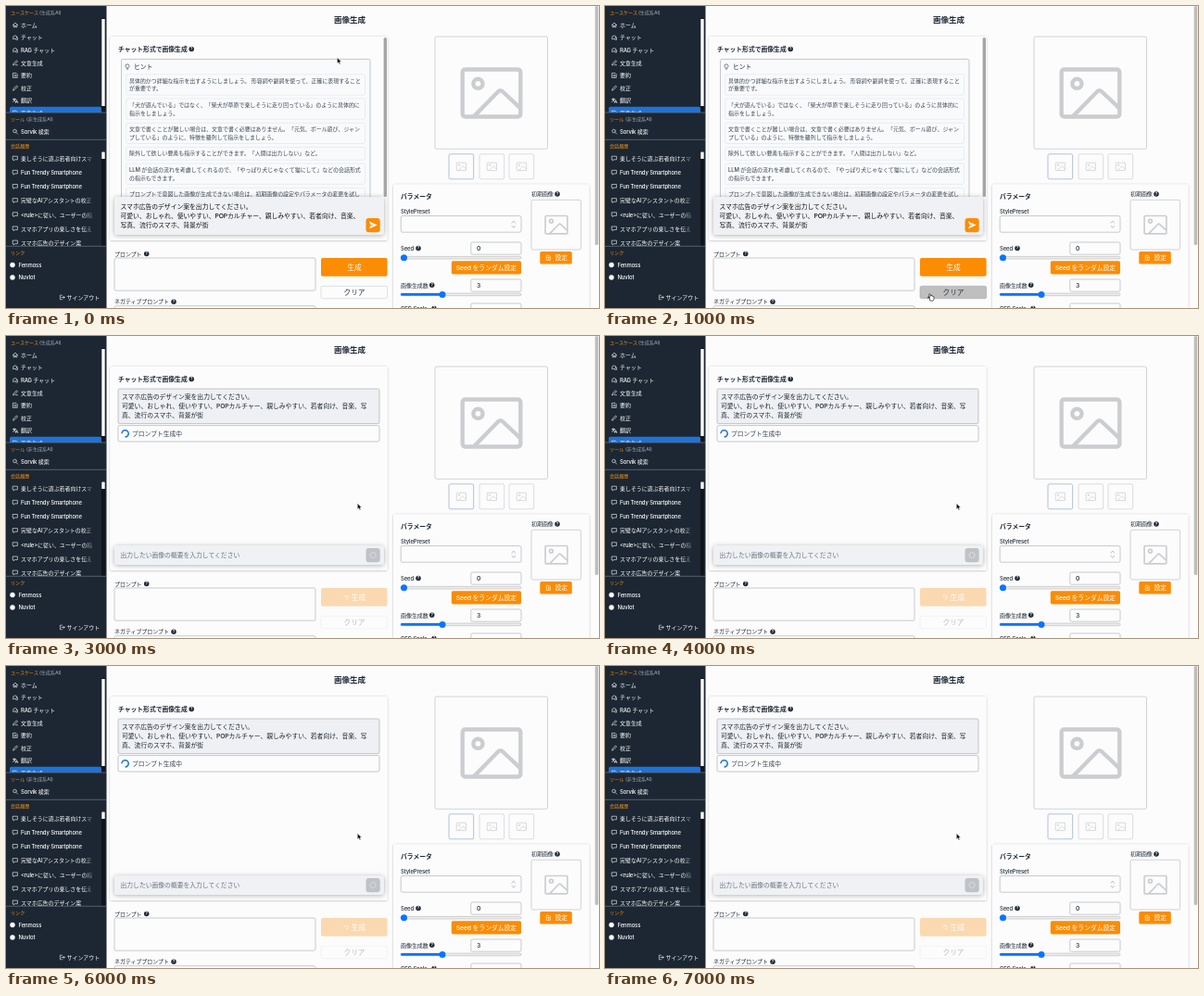
Recreate the animation shown at these times as an HTML page. Size 640x326 px, loop 8 s.

```html
<!DOCTYPE html>
<html lang="ja">
<head>
<meta charset="utf-8">
<title>画像生成</title>
<style>
html, body { margin: 0; width: 100%; height: 100%; overflow: hidden; background: #fcfcfc; }
svg { display: block; width: 640px; height: 326px; }
text {
  font-family: Inter, "Noto Sans CJK JP", "Noto Sans CJK", sans-serif;
  font-weight: 500; white-space: pre; text-spacing-trim: space-all;
}
.en { letter-spacing: -.02em; }
</style>
</head>
<body>
<svg id="stage" viewBox="0 0 640 326" xmlns="http://www.w3.org/2000/svg"></svg>
<script>
const NAVY = '#1c2733', ORANGE = '#fb8c04', BLUE = '#1f72d8', ACCENT = '#0b74ff';
const INK = '#1f2937', PAPER = '#fcfcfc', EDGE = '#a3a8b1', PALE = '#cbcdd0';
const S = 5.95, M = 6.8, L = 7.65;

const escape = s => s.replace(/&/g, '&amp;').replace(/</g, '&lt;').replace(/>/g, '&gt;');

// Text whose middle sits at cy; Latin runs get tighter tracking.
function text(x, cy, size, str, fill = INK, more = '') {
  const body = escape(str).replace(/[ -~]+/g, run => `<tspan class="en">${run}</tspan>`);
  return `<text x="${x}" y="${cy + size * .37}" font-size="${size}" fill="${fill}" ${more}>${body}</text>`;
}
const bold = 'style="font-weight:600"';
const mid = 'text-anchor="middle"';

function box(x1, y1, x2, y2, fill, stroke = 'none', r = 1.7, more = '') {
  return `<rect x="${x1}" y="${y1}" width="${x2 - x1}" height="${y2 - y1}" rx="${r}" fill="${fill}" stroke="${stroke}" stroke-width=".6" ${more}/>`;
}
const line = (d, color, w = .6, more = '') =>
  `<path d="${d}" fill="none" stroke="${color}" stroke-width="${w}" stroke-linecap="round" stroke-linejoin="round" ${more}/>`;
const at = (x, y, body) => `<g transform="translate(${x} ${y})">${body}</g>`;
const lines = (x, cy, step, size, rows, fill) =>
  rows.map((row, i) => text(x, cy + i * step, size, row, fill)).join('');

const help = (x, y) => `<circle cx="${x}" cy="${y}" r="2.75" fill="${INK}"/>` +
  text(x, y, 4.4, '?', '#fff', `${mid} ${bold}`);

const picture = (cx, cy, w) =>
  `<use href="#picture" transform="translate(${cx} ${cy}) scale(${w / 23})" stroke="${PALE}"/>`;

const defs = `<defs>
  <filter id="shadow" x="-10%" y="-10%" width="120%" height="125%">
    <feDropShadow dx="0" dy=".4" stdDeviation="1.1" flood-opacity=".28"/>
  </filter>
  <filter id="glow" x="-10%" y="-60%" width="120%" height="220%">
    <feDropShadow dx="0" dy=".6" stdDeviation="2.8" flood-opacity=".32"/>
  </filter>
  <linearGradient id="fade"><stop stop-color="${NAVY}" stop-opacity="0"/><stop offset="1" stop-color="${NAVY}"/></linearGradient>
  <clipPath id="uses"><rect width="108" height="114.8"/></clipPath>
  <clipPath id="talks"><rect width="108" height="259"/></clipPath>
  <g id="picture" fill="none" stroke-width="1.5">
    <rect x="-10.75" y="-8.75" width="21.5" height="17.5" rx="1"/>
    <circle cx="-5" cy="-3.5" r="1.75"/>
    <path d="M-6.6 8.7L2.5-.6Q3.3-1.3 4.1-.6L10.7 5.6"/>
  </g>
</defs>`;

// Small outline icons, each about 5.5 wide around its centre.
const icons = {
  home: 'M-2.7 .2L0-2.5L2.7 .2M-1.8-.4V2.4H-.6V.7H.6V2.4H1.8V-.4',
  chat: 'M-2.4 1.4Q-3-2.2-.3-2.2Q2-2 1.8 0Q1.4 1.6-.8 1.4ZM2-.6Q3 .6 2.4 2.4L.6 2.1',
  pen: 'M-2.3 2.3L-1.8.6L1.5-2.5L2.5-1.4L-.7 1.9ZM.5 2.4H2.5',
  note: 'M-2.2-2.5H1L2.2-1.3V2.5H-2.2ZM-1-.3H1M-1 1H1',
  check: 'M-2.3 2.3L-1.8.6L1.5-2.5L2.5-1.4L-.7 1.9Z',
  lang: 'M-2.6-1.5H.6M-1-2.5V-1.5M.1-1.5Q-.4.5-2.5 1.3M-1.8-1.4Q-1.2.3.2.9M.2 2.5L1.5-.6L2.8 2.5M.7 1.5H2.3',
  find: 'M1 1L2.6 2.6M1.3-.5A1.8 1.8 0 1 1-2.3-.5A1.8 1.8 0 1 1 1.3-.5',
  bubble: 'M-2.4-2.2H2.4V1.4H-.4L-1.8 2.6V1.4H-2.4Z',
  exit: 'M-.3-2.3H-2.3V2.3H-.3M-.8 0H2.5M1.2-1.3L2.5 0L1.2 1.3',
  file: 'M-1.9-2.5H.6L1.9-1.2V2.5H-1.9ZM0 1.4V-.7M-.9.1L0-.8L.9.1',
  bulb: 'M-.9 1.3Q-2.2.2-2-1Q-1.6-2.7 0-2.7Q1.6-2.7 2-1Q2.2.2.9 1.3ZM-.8 2.5H.8'
};
const icon = (name, x, y, color = '#fff') => at(x, y, line(icons[name], color));

function sidebar() {
  const head = (cy, title, note = '', x = 35.9) => text(5, cy, 5.1, title, '#f29113') +
    text(x, cy, 5.1, note, '#9aa3ad');
  const uses = [['home', 'ホーム'], ['chat', 'チャット'], ['chat', 'RAG チャット'], ['pen', '文章生成'],
    ['note', '要約'], ['check', '校正'], ['lang', '翻訳'], ['note', '画像生成']];
  const talks = ['楽しそうに遊ぶ若者向けスマ', 'Fun Trendy Smartphone', 'Fun Trendy Smartphone',
    '完璧なAIアシスタントの校正', '<rule>に従い、ユーザーの指', 'スマホアプリの楽しさを伝え', 'スマホ広告のデザイン案'];
  let out = box(0, 0, 108.5, 326, NAVY, 'none', 0) + head(7, 'ユースケース', '(生成系AI)');
  out += '<g clip-path="url(#uses)">' + box(4, 108.8, 103, 122, BLUE);
  uses.forEach(([name, label], i) => {
    const y = 20.5 + i * 13.6;
    out += icon(name, 10, y) + text(16, y, S, label, '#fff');
  });
  out += '</g>' + box(103, 13, 107, 114.5, '#10151c', 'none', 0) + box(103.3, 14, 106.7, 108, '#fff', 'none', .5);
  out += head(122, 'ツール', '(非生成系AI)', 22) +
    icon('find', 10, 135.5) + text(16, 135.5, S, 'Sorvik 検索', '#fff') + head(151.2, '会話履歴');
  out += '<g clip-path="url(#talks)">';
  talks.forEach((label, i) => {
    const y = 164.8 + i * 15.15;
    out += icon('bubble', 10, y - .4) + text(16, y, S, label, '#fff');
  });
  out += box(84, 157, 96, 259, 'url(#fade)', 'none', 0) + box(96, 157, 102.5, 259, NAVY, 'none', 0) + '</g>';
  out += box(103, 157, 107, 259, '#10151c', 'none', 0) + box(103.3, 157.5, 106.7, 165, '#fff', 'none', .5);
  out += [115, 144.3, 259.3].map(y => line(`M0 ${y}H108`, '#8d96a0', .5)).join('');
  out += head(266, 'リンク') + '<circle cx="7" cy="279.5" r="2.7" fill="#fff"/><circle cx="7" cy="293" r="2.7" fill="#fff"/>' +
    text(13.5, 279.5, S, 'Fenmoss', '#fff') + text(13.5, 293, S, 'Nuvlot', '#fff');
  return out + icon('exit', 60.7, 314.5) + text(65.5, 314.5, S, 'サインアウト', '#fff');
}

function results() {
  let out = box(463, 33, 584.5, 154.3, PAPER, '#b4b8be') + picture(524, 94, 67);
  [478, 511, 543].forEach((x, i) => {
    out += box(x, 159.8, x + 26.7, 186.8, PAPER, i ? '#c3c7cd' : '#7f9cc4') + picture(x + 13.4, 173.4, 11);
  });
  return out;
}

function slider(y, x) {
  return box(426, y - 1.3, 556, y + 1.3, '#eeeeee', '#b5b5b5', 1.3) +
    box(426, y - 1.4, x, y + 1.4, ACCENT, 'none', 1.4) + `<circle cx="${x}" cy="${y}" r="3.5" fill="${ACCENT}"/>`;
}

function params() {
  const field = (y, value) => box(501.8, y, 556, y + 13.2, PAPER, EDGE) + text(508, y + 6.6, M, value);
  return box(418, 192.5, 629.5, 345, PAPER, 'none', 2, 'filter="url(#shadow)"') +
    text(426, 205.5, M, 'パラメータ', INK, bold) + text(426, 221.8, S, 'StylePreset') +
    box(426.2, 226.6, 556, 244.2, PAPER, EDGE) +
    line('M546 234.2L547.8 232L549.6 234.2M546 237.2L547.8 239.4L549.6 237.2', EDGE, .7) +
    text(567, 203, S, '初期画像') + help(595, 203) +
    box(567, 209.3, 620.6, 263, PAPER, '#b4b8be') + picture(594, 236.2, 25.5) +
    box(576.3, 265.1, 610.8, 278.6, ORANGE) + icon('file', 585.5, 271.8, '#fff') + text(592.5, 271.8, M, '設定', '#fff') +
    text(426, 261.6, S, 'Seed') + help(445, 261.6) + field(255, '0') + slider(271.7, 429.5) +
    box(480.8, 275.2, 556, 289.5, ORANGE) + text(518.5, 282.4, M, 'Seed をランダム設定', '#fff', mid) +
    text(426, 301.3, S, '画像生成数') + help(459.7, 301.3) + field(295, '3') + slider(311.4, 471) +
    text(426, 326.6, S, 'CFG Scale') + help(462, 326.6) + field(321, '');
}

function promptForm() {
  return text(117, 267.5, S, 'プロンプト') + help(151.7, 267.5) + box(117, 272, 334, 307.2, PAPER, EDGE) +
    text(117, 319.2, S, 'ネガティブプロンプト') + help(181, 319.2) + box(117, 323.7, 334, 350, PAPER, EDGE);
}

// Three quarters of a ring, open at the lower left.
const busyRing = (x, y, r, color, w) => at(x, y,
  line(`M${-r} 0A${r} ${r} 0 1 1 0 ${r}`, color, w, 'style="stroke-linecap:butt"'));

function buttons(busy, hover) {
  const label = busy ? busyRing(367, 282, 2, '#fff', .7) + text(380.5, 282, L, '生成', '#fff', mid)
    : text(376, 282, L, '生成', '#fff', mid);
  return `<g opacity="${busy ? .3 : 1}">` + box(340, 272, 411.6, 291.8, ORANGE) + label +
    box(340, 302.4, 411.6, 315.8, hover ? '#bfbfbf' : PAPER, hover ? '#9fa3a9' : '#c9cdd3') +
    text(376, 309, L, 'クリア', '#2d3641', mid) + '</g>';
}

const card = box(112.3, 33, 411.6, 253, PAPER, 'none', 2, 'filter="url(#shadow)"') +
  text(121, 46.5, M, 'チャット形式で画像生成', INK, bold) + help(200.2, 46.5);

function hints() {
  const tips = [
    ['具体的かつ詳細な指示を出すようにしましょう。 形容詞や副詞を使って、正確に表現すること', 'が重要です。'],
    ['「犬が遊んでいる」ではなく、「柴犬が草原で楽しそうに走り回っている」のように具体的に', '指示をしましょう。'],
    ['文章で書くことが難しい場合は、文章で書く必要はありません。「元気、ボール遊び、ジャン', 'プしている」のように、特徴を羅列して指示をしましょう。'],
    ['除外して欲しい要素も指示することができます。「人間は出力しない」など。'],
    ['LLM が会話の流れを考慮してくれるので、「やっぱり犬じゃなくて猫にして」などの会話形式', 'の指示もできます。'],
    ['プロンプトで意図した画像が生成できない場合は、初期画像の設定やパラメータの変更を試し', 'てみましょう。']
  ];
  let y = 73.8;
  let out = box(124.5, 57.4, 393, 230, '#f9fafb', '#9ca3af') + icon('bulb', 131, 65.5, INK) + text(138, 65.5, M, 'ヒント');
  for (const tip of tips) {
    const h = tip.length * 8.5 + 5.3;
    out += box(129.8, y, 387.5, y + h, '#f9fafb', '#dfe2e7') + lines(133, y + 6.8, 8.5, S, tip, '#3c4552');
    y += h + 3.9;
  }
  return out;
}

const ask = 'スマホ広告のデザイン案を出力してください。';
const wish = '可愛い、おしゃれ、使いやすい、POPカルチャー、親しみやすい、若者向け、音楽、';
const inputBox = top => box(117, top, 408, 247, '#eff1f4', 'none', 3.4, 'filter="url(#glow)"');

function draft() {
  return hints() + box(407.6, 34, 411, 206, '#a6a6a6', 'none', 1.5) + inputBox(206) +
    lines(123.5, 216.4, 10.2, M, [ask, wish, '写真、流行のスマホ、背景が街'], '#111') +
    box(388.5, 229, 403.7, 244.2, ORANGE, 'none', 3) +
    at(396, 236.6, '<path d="M-4-4L4.6 0L-4 4L-2.6.6L1.5 0L-2.6-.6Z" fill="#fff"/>');
}

function waiting() {
  return box(121, 57, 403, 94.6, '#eff0f3', '#9ca3af') +
    lines(125, 65.5, 10.2, M, [ask, wish + '写', '真、流行のスマホ、背景が街'], '#1a2430') +
    box(121, 96.6, 403, 114, PAPER, '#9ca3af') + busyRing(128.6, 105.3, 3.6, BLUE, 1.6) +
    text(136, 105.3, M, 'プロンプト生成中', '#374151') + inputBox(226.4) +
    text(123.5, 236.6, M, '出力したい画像の概要を入力してください', '#6b7280') +
    box(388.5, 229, 403.7, 244.2, '#bfc2c7', 'none', 3) +
    at(396.1, 236.6, '<circle r="3" fill="none" stroke="#fff" stroke-width=".8" stroke-dasharray="1.3 1"/>');
}

const arrow = (x, y) => at(x, y,
  '<path d="M0 0V6.2L1.5 4.9L2.5 7.2L3.6 6.7L2.6 4.5H4.6Z" fill="#000" stroke="#fff" stroke-width=".5"/>');
const hand = (x, y) => at(x, y,
  '<path d="M-.8 0Q0-.8.6 0L1.2 2.2Q2-.1 2.6 2.3Q3.5 1.4 3.7 2.8Q4.7 2.4 4.6 3.6Q4.7 5.8 3.6 7.2H.3Q-1-.1-2.1 4.2Q-1.8 3-.1 4Z" fill="#fff" stroke="#000" stroke-width=".6"/>');

const base = defs + box(0, 0, 640, 326, PAPER, 'none', 0) + results() + params() + promptForm() +
  text(371, 14.8, 8.5, '画像生成', INK, `${mid} ${bold}`) + sidebar() +
  box(635.7, 0, 639.3, 258, '#bdbdbd', 'none', 1.6);

const scenes = [
  card + draft() + buttons(false, false) + arrow(357.4, 55.8),
  card + draft() + buttons(false, true) + hand(350.5, 311),
  card + draft() + buttons(false, false) + arrow(396.6, 248),
  card + waiting() + buttons(true, false) + arrow(379.3, 180.8)
];

const stage = document.getElementById('stage');
stage.innerHTML = base + '<g id="scene"></g>';
const view = document.getElementById('scene');
const start = performance.now();
let shown = -1;

function draw() {
  const t = (performance.now() - start) % 8000;
  const next = Math.min(3, Math.floor(t / 1000));
  if (next !== shown) view.innerHTML = scenes[shown = next];
  requestAnimationFrame(draw);
}
draw();
</script>
</body>
</html>
```
